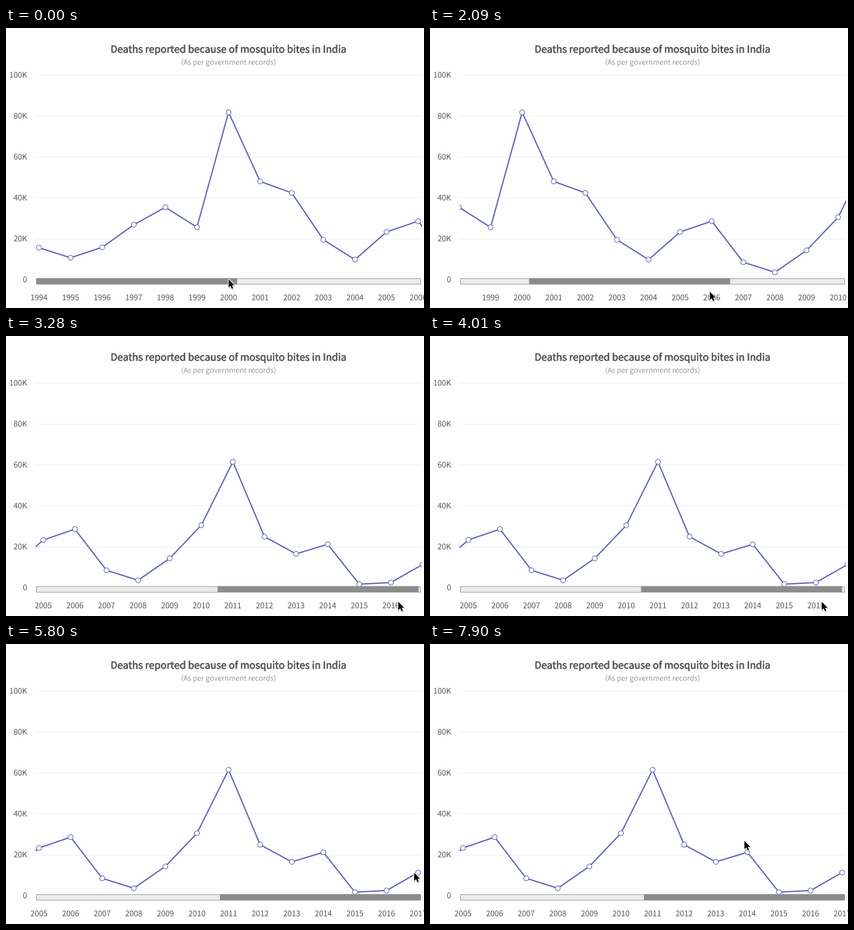
Animation of 678 by 453 pixels, one loop 8 s. Source, as a matplotlib script:

```python
import numpy as np
import matplotlib.pyplot as plt
from matplotlib.animation import FuncAnimation
from matplotlib.patches import Circle, Polygon, Rectangle
from matplotlib.patheffects import Normal, withStroke
from matplotlib.transforms import Affine2D

W, H, DPI = 678, 453, 64
PX = 72 / DPI                    # points per pixel
FRAME_MS, LOOP_MS = 50, 8000
STEP_MS = 150                    # the picture is refreshed this often while moving

plt.rcParams.update({
    "font.family": "Noto Sans CJK JP",
    "text.hinting": "none",
    "toolbar": "None",
})

# Chart geometry in pixels
FIRST_X, YEAR_W = 53.5, 51.25
LEFT, RIGHT = 48, 673
ZERO_Y, PER_K = 406.8, 3.31
TRACK_X, TRACK_W, THUMB_W = 49, 624, 326
MAX_PULL = TRACK_W - THUMB_W
SCROLL_RATIO = 11 * YEAR_W / MAX_PULL

BLUE, GREY = "#5d62b5", "#555555"

# Deaths in thousands, 1994 to 2017
deaths = np.array([15.5, 10.6, 15.7, 26.7, 35.3, 25.5, 81.7, 47.9,
                   42.3, 19.4, 9.7, 23.2, 28.5, 8.4, 3.5, 14.2,
                   30.4, 61.4, 24.8, 16.4, 21.1, 1.6, 2.4, 11.2])
base_x = FIRST_X + YEAR_W * np.arange(len(deaths))
point_y = ZERO_Y - PER_K * deaths

# Pointer moves: first and last refresh in ms, then the place reached
START = (361, 406.5)
GRAB_X = 342
DRAG_START, DRAG_END = 1790, 4310
MOVES = [
    (150, 450, 403, 411),
    (890, 1340, GRAB_X, 407),
    (DRAG_START, 2090, 453.8, 426.5),
    (2390, 3280, 636.3, 430),
    (3570, 4010, 635.4, 430),
    (4160, DRAG_END, 649, 430),
    (4610, 4760, 642, 430.5),
    (5350, 5500, 341, 411),
    (5650, 5800, 662, 370),
    (6250, 6850, 341, 411),
    (7000, 7000, 348, 415),
    (7600, 7750, 649, 390),
    (7900, 7900, 510, 318.5),
]
HAND_EASE, CHART_EASE = 3.5, 2.88    # the chart lags behind the hand


def follow(t, power):
    """Place at time t on the stepped, eased-out pointer path."""
    here = np.array(START)
    for first, last, x, y in MOVES:
        if t < first:
            break
        steps = round((last - first) / STEP_MS) + 1
        done = 1
        if t < last:
            done = (1 + int((t - first) / (last - first) * (steps - 1))) / steps
        here = here + (np.array([x, y]) - here) * (1 - (1 - done) ** power)
    return here


def pull(x):
    return np.clip(x - GRAB_X, 0, MAX_PULL)


def state(t):
    """Pointer place, thumb offset and chart scroll at time t."""
    hand = follow(t, HAND_EASE)
    if t < DRAG_START:
        hand_pull = chart_pull = 0
    elif t >= DRAG_END:
        hand_pull = chart_pull = MAX_PULL
    else:
        hand_pull = pull(hand[0])
        chart_pull = pull(follow(t, CHART_EASE)[0])
    return hand, (hand_pull + chart_pull) / 2, chart_pull * SCROLL_RATIO


fig = plt.figure(figsize=(W / DPI, H / DPI), dpi=DPI, facecolor="#fefefe")
ax = fig.add_axes([0, 0, 1, 1])
ax.set_xlim(0, W)
ax.set_ylim(H, 0)
ax.axis("off")

pointer_shift = Affine2D()
scroll_shift = Affine2D()
on_chart = scroll_shift + ax.transData
plot_area = Rectangle((LEFT - 0.5, 0), 675 - LEFT, H, transform=ax.transData)


def label(x, y, text, size, color=GREY, ha="center", bold=0, **kw):
    # a path effect keeps text on subpixel positions
    effect = withStroke(linewidth=bold * PX, foreground=color) if bold else Normal()
    return ax.text(x, y, text, fontsize=size * PX, color=color, ha=ha,
                   va="baseline", path_effects=[effect], **kw)


label(360.8, 40, "Deaths reported because of mosquito bites in India", 16.1,
      bold=0.5)
label(361, 59.5, "(As per government records)", 11.64, "#999999")

for k in range(0, 101, 20):
    y = ZERO_Y - PER_K * k
    if k:
        ax.plot([LEFT, RIGHT], [round(y) + 0.5] * 2, color="#f1f1f1", lw=PX,
                zorder=1, solid_capstyle="butt", snap=False)
    label(34.2, y + 4.6, f"{k}K" if k else "0", 12.53, ha="right")

year_labels = [label(x, 440.5, str(1994 + i), 12.53, transform=on_chart, zorder=4)
               for i, x in enumerate(base_x)]

line, = ax.plot(base_x, point_y, color=BLUE, lw=2 * PX, zorder=2,
                solid_joinstyle="round", transform=on_chart)
line.set_clip_path(plot_area)
for spot in zip(base_x, point_y):
    dot = ax.add_patch(Circle(spot, 4, fc="white", ec=BLUE, lw=PX, zorder=3,
                              transform=on_chart))
    dot.set_clip_path(plot_area)

ax.add_patch(Rectangle((TRACK_X + 0.5, 405.5), TRACK_W - 1, 9, fc="#ebebeb",
                       ec="#a3a3a3", lw=PX, zorder=5, snap=False))
thumb = ax.add_patch(Rectangle((TRACK_X, 404.6), THUMB_W, 10, fc="#8c8c8c",
                               lw=0, zorder=6, snap=False))

# Arrow pointer: soft shadow, white rim, black body
ARROW = 0.92 * np.array([(0, 0), (0, 14.6), (3.4, 11.5), (5.8, 16.8),
                         (8.2, 15.7), (5.9, 10.6), (10.4, 10.6)])


def pointer_layer(shift, zorder, **style):
    ax.add_patch(Polygon(ARROW + shift, closed=True, zorder=zorder,
                         transform=pointer_shift + ax.transData, **style))


pointer_layer((0.5, 1.2), 10, fc="black", ec="black", lw=2 * PX, alpha=0.16)
pointer_layer((0, 0), 11, fc="white", ec="white", lw=2.2 * PX)
pointer_layer((0, 0), 12, fc="black", lw=0)


def draw(n):
    # show the state near the end of the frame, so no step comes late
    t = n * FRAME_MS + FRAME_MS - 10
    hand, offset, scroll = state(t)
    pointer_shift.clear().translate(*hand)
    scroll_shift.clear().translate(-scroll, 0)
    thumb.set_x(TRACK_X + offset)
    for text, x in zip(year_labels, base_x - scroll):
        text.set_visible(LEFT <= x <= RIGHT)
    return [line, thumb, *year_labels]


anim = FuncAnimation(fig, draw, frames=LOOP_MS // FRAME_MS,
                     interval=FRAME_MS, repeat=True, repeat_delay=0)
plt.show()
```
